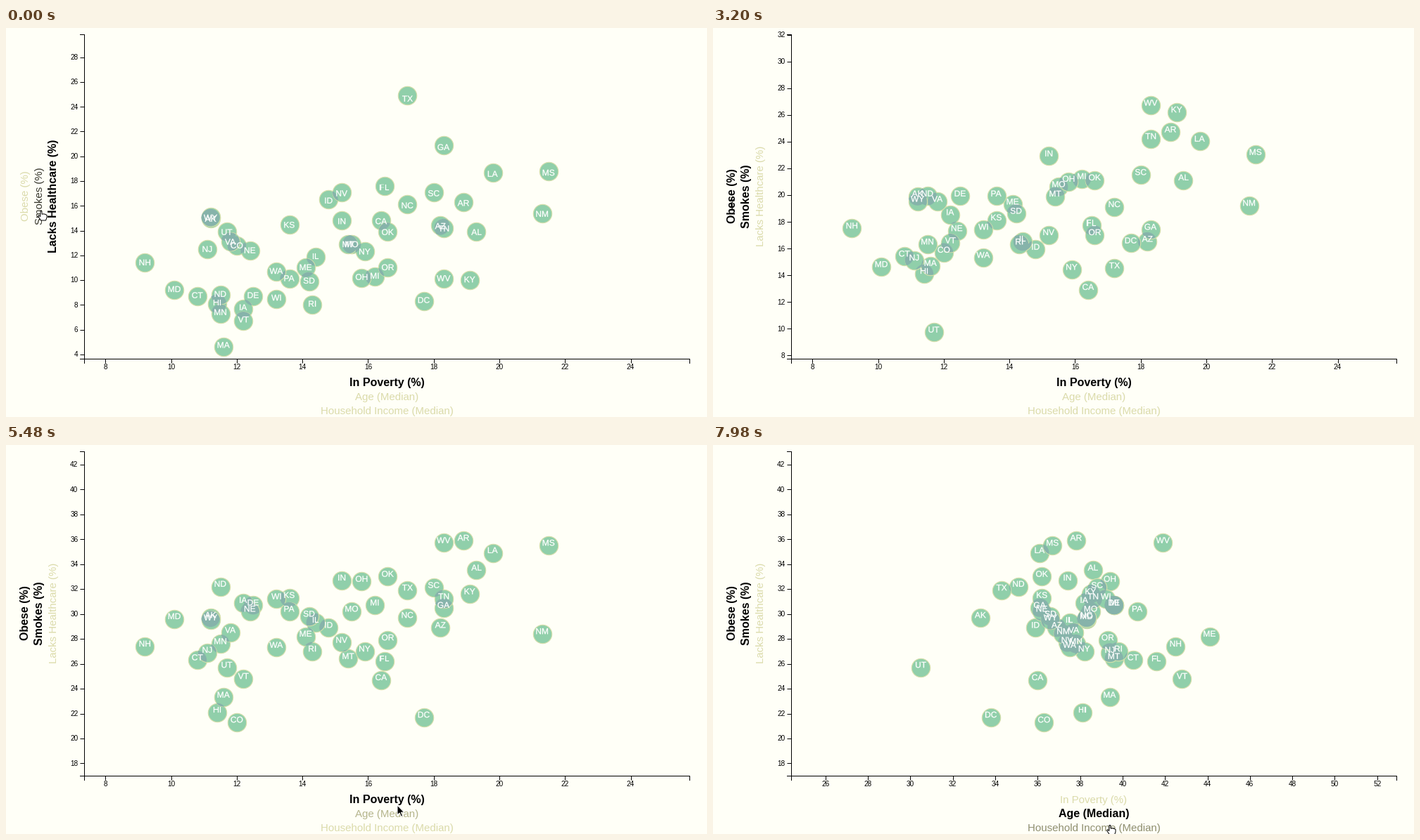
Animation, 996 px wide and 554 px high, one loop 8000 ms. Source, as a matplotlib script:

```python
import numpy as np
import matplotlib.pyplot as plt
from matplotlib.animation import FuncAnimation
from matplotlib.collections import PathCollection, PolyCollection
from matplotlib.patches import Polygon
from matplotlib.path import Path
from matplotlib.textpath import TextPath
from matplotlib.transforms import IdentityTransform

W, H, DPI = 996, 554, 64
PX = 72 / DPI                      # one pixel in points
LEFT, RIGHT, TOP, BOTTOM = 111.5, 971.5, 8.5, 470.5
R = 13.2
BG = "#fffff7"
PALE = np.array([0.86, 0.86, 0.67])
DARK = np.array([0.22, 0.22, 0.18])

STATES = ("AL AK AZ AR CA CO CT DE DC FL GA HI ID IL IN IA KS KY LA ME MD MA MI "
          "MN MS MO MT NE NV NH NJ NM NY NC ND OH OK OR PA RI SC SD TN TX UT VT "
          "VA WA WV WI WY").split()
POVERTY = np.array([
    19.3, 11.2, 18.2, 18.9, 16.4, 12, 10.8, 12.5, 17.7, 16.5,
    18.3, 11.4, 14.8, 14.4, 15.2, 12.2, 13.6, 19.1, 19.8, 14.1,
    10.1, 11.6, 16.2, 11.5, 21.5, 15.5, 15.4, 12.4, 15.2, 9.2,
    11.1, 21.3, 15.9, 17.2, 11.5, 15.8, 16.6, 16.6, 13.6, 14.3,
    18, 14.2, 18.3, 17.2, 11.7, 12.2, 11.8, 13.2, 18.3, 13.2, 11.2])
AGE = np.array([
    38.6, 33.3, 36.9, 37.8, 36, 36.3, 40.5, 39.6, 33.8, 41.6,
    36.1, 38.1, 35.9, 37.5, 37.4, 38.2, 36.2, 38.5, 36.1, 44.1,
    38.3, 39.4, 39.6, 37.8, 36.7, 38.5, 39.6, 36.2, 37.4, 42.5,
    39.4, 37.2, 38.2, 38.3, 35.1, 39.4, 36.2, 39.3, 40.7, 39.8,
    38.8, 36.6, 38.6, 34.3, 30.5, 42.8, 37.7, 37.5, 41.9, 39.2, 36.6])
HEALTH = np.array([
    13.9, 15, 14.4, 16.3, 14.8, 12.8, 8.7, 8.7, 8.3, 17.6,
    20.9, 8.1, 16.5, 11.9, 14.8, 7.7, 14.5, 10, 18.7, 11,
    9.2, 4.6, 10.3, 7.3, 18.8, 12.9, 12.9, 12.4, 17.1, 11.4,
    12.5, 15.4, 12.3, 16.1, 8.8, 10.2, 13.9, 11, 10.1, 8,
    17.1, 9.9, 14.2, 24.9, 13.9, 6.7, 13.1, 10.7, 10.1, 8.5, 15.1])
SMOKES = np.array([
    21.1, 19.9, 16.5, 24.7, 12.9, 15.7, 15.4, 19.9, 16.4, 17.7,
    17.4, 14.1, 15.9, 16.5, 22.9, 18.5, 18.1, 26.2, 24, 19.3,
    14.6, 14.7, 21.2, 16.3, 23, 20.6, 19.9, 17.3, 17, 17.5,
    15.1, 19.2, 14.4, 19.1, 19.9, 21, 21.1, 17, 19.9, 16.3,
    21.5, 18.6, 24.2, 14.5, 9.7, 16.4, 19.5, 15.3, 26.7, 17.4, 19.5])
OBESE = np.array([
    33.5, 29.7, 28.9, 35.9, 24.7, 21.3, 26.3, 30.7, 21.7, 26.2,
    30.5, 22.1, 28.9, 29.3, 32.7, 30.9, 31.3, 31.6, 34.9, 28.2,
    29.6, 23.3, 30.7, 27.6, 35.5, 30.2, 26.4, 30.2, 27.7, 27.4,
    26.9, 28.4, 27, 29.7, 32.2, 32.6, 33, 27.9, 30.2, 27,
    32.1, 29.8, 31.2, 31.9, 25.7, 24.8, 28.5, 27.3, 35.7, 31.2, 29.5])

CLICK_SMOKES, CLICK_OBESE, CLICK_AGE, SPAN = 7.2, 65.4, 139.2, 30


def mix(a, b, t):
    return a + (b - a) * t


def ease(t):
    t = min(max(t, 0), 1)
    return 4 * t ** 3 if t < 0.5 else 1 - (2 - 2 * t) ** 3 / 2


def ramp(k, start):
    return min(max((k - start) / 17, 0), 1)


def domain(data):
    return data.min() * 0.8, data.max() * 1.2


def scale(v, data, start, end):
    lo, hi = domain(data)
    return start + (end - start) * (v - lo) / (hi - lo)


def scale_x(v, data):
    return scale(v, data, LEFT, RIGHT)


def scale_y(v, data):
    return scale(v, data, BOTTOM, TOP)


def step_at(i):
    """Recorded step shown in a 20 ms slot: steps last 20, 100, 20 ms in turn."""
    n, slot = divmod(i, 7)
    return 3 * n + (0 if slot == 0 else 1 if slot < 6 else 2)


fig = plt.figure(figsize=(W / DPI, H / DPI), dpi=DPI, facecolor=BG)
ax = fig.add_axes([0, 0, 1, 1])
ax.axis("off")
plt.rcParams["font.family"] = "Liberation Sans"


class Ticks:
    def __init__(self, values, horizontal):
        self.values, self.horizontal = values, horizontal
        self.scale = scale_x if horizontal else scale_y
        align = (dict(ha="center", va="baseline") if horizontal
                 else dict(ha="right", va="baseline"))
        self.marks = [ax.plot([], [], "k", lw=PX, solid_capstyle="butt")[0] for _ in values]
        self.labels = [ax.text(0, 0, str(v), size=10 * PX, **align) for v in values]

    def update(self, a, b, t):
        for v, mark, label in zip(self.values, self.marks, self.labels):
            p = mix(self.scale(v, a), self.scale(v, b), t)
            shown = [float(lo <= v <= hi) for lo, hi in (domain(a), domain(b))]
            alpha = mix(*shown, t)
            visible = alpha > 0.01 and -20 < p < W + 20
            for art in (mark, label):
                art.set_visible(visible)
                art.set_alpha(alpha)
            if self.horizontal:
                mark.set_data([p, p], [BOTTOM, BOTTOM + 6])
                label.set_position((p, BOTTOM + 15.8))
            else:
                mark.set_data([LEFT - 6, LEFT], [p, p])
                label.set_position((LEFT - 9, p + 3.4))


class Title:
    def __init__(self, text, x, y, rotation=0):
        self.art = ax.text(x, y, text, ha="center", va="baseline",
                           rotation=rotation, rotation_mode="anchor")

    def update(self, active, level):
        self.art.set_weight("bold" if active else "normal")
        self.art.set_size((16 if active else 15) * PX)
        self.art.set_color("black" if active else mix(PALE, DARK, level))


def label_path(text):
    path = TextPath((0, 0), text, size=12, prop={"family": "Liberation Sans"})
    box = path.get_extents()
    return Path(path.vertices - [(box.x0 + box.x1) / 2, 0], path.codes)


def lenses(x, y):
    """Outlines of the areas where two circles overlap."""
    i, j = np.triu_indices(len(x), 1)
    dx, dy = x[j] - x[i], y[j] - y[i]
    d = np.hypot(dx, dy)
    near = d < 2 * R - 1
    i, j, d = i[near], j[near], d[near]
    aim = np.arctan2(dy[near], dx[near])[:, None]
    half = np.arccos(d / (2 * R))[:, None] * np.linspace(-1, 1, 14)
    out = []
    for c, a in ((i, aim + half), (j, aim + np.pi + half)):
        out.append(np.stack([x[c][:, None] + R * np.cos(a),
                             y[c][:, None] + R * np.sin(a)], axis=-1))
    return np.concatenate(out, axis=1)


# Axis lines with outer ticks
ax.plot([LEFT - 6, LEFT, LEFT, LEFT - 6], [TOP, TOP, BOTTOM, BOTTOM], "k", lw=PX)
ax.plot([LEFT, LEFT, RIGHT, RIGHT], [BOTTOM + 6, BOTTOM, BOTTOM, BOTTOM + 6], "k", lw=PX)
x_ticks = Ticks(range(8, 54, 2), True)
y_ticks = Ticks(range(4, 44, 2), False)

obese = Title("Obese (%)", 32.5, 239.5, 90)
smokes = Title("Smokes (%)", 52.5, 239.5, 90)
health = Title("Lacks Healthcare (%)", 72.5, 239.5, 90)
poverty = Title("In Poverty (%)", 541, 510)
age = Title("Age (Median)", 541, 530)
income = Title("Household Income (Median)", 541, 550)

dots = ax.scatter(POVERTY, HEALTH, s=(2 * R * PX) ** 2, fc="#90cfaa",
                  ec="#d6dfab", lw=1.1 * PX, zorder=4)
overlaps = PolyCollection([], fc="#86b3aa", ec="none", zorder=5)
ax.add_collection(overlaps, autolim=False)
names = PathCollection([label_path(s) for s in STATES], fc="white", ec="white",
                       lw=0.3, offsets=np.zeros((len(STATES), 2)),
                       offset_transform=ax.transData, zorder=6)
names.set_transform(IdentityTransform())
ax.add_collection(names, autolim=False)

SHAPES = {
    "arrow": np.array([(-3, -7), (-3, 7), (0.2, 4), (2.5, 9.2), (4.7, 8.2),
                       (2.4, 3.2), (6.8, 3.2)]),
    "beam": np.array([(-3, -7), (-1, -7), (0, -6), (1, -7), (3, -7), (1, -7), (0, -6),
                      (0, 6), (1, 7), (3, 7), (1, 7), (0, 6), (-1, 7), (-3, 7)]),
    "hand": np.array([(-3, -6.5), (-1.2, -6.5), (-0.8, -1.8), (1.5, -2.2), (4, -1.6),
                      (6, -0.5), (6, 3), (4.5, 7), (-2.5, 7), (-6.5, 1),
                      (-5.5, -0.3), (-3.2, 1.5)]),
}
STYLES = {
    "arrow": dict(fc="black", ec="white", closed=True),
    "beam": dict(fc="none", ec="black", closed=False),
    "hand": dict(fc="white", ec="black", closed=True),
}
pointers = {n: ax.add_patch(Polygon(SHAPES[n], lw=PX, zorder=9, **STYLES[n])) for n in SHAPES}

TRAIL = np.array([
    (0, 52, 267), (8, 47, 258), (45, 46, 256), (56, 28, 252), (72, 27, 252),
    (87, 110, 580), (104, 560, 580), (118, 559, 520), (130, 555, 519),
    (160, 554, 519), (168, 565, 547), (171, 566, 548)])


def move_pointer(k):
    spot = [np.interp(k, TRAIL[:, 0], TRAIL[:, c]) for c in (1, 2)]
    if k < 9 or k > 162:
        kind = "hand"
    else:
        kind = "arrow" if 72 < k < 123 else "beam"
    for name, patch in pointers.items():
        patch.set_visible(name == kind)
        patch.set_xy(SHAPES[name] + spot)


def update(i):
    k = step_at(i)
    tx = ease((k - CLICK_AGE) / SPAN)
    if k < CLICK_OBESE:
        ya, yb, ty = HEALTH, SMOKES, ease((k - CLICK_SMOKES) / SPAN)
    else:
        ya, yb, ty = SMOKES, OBESE, ease((k - CLICK_OBESE) / SPAN)

    x_ticks.update(POVERTY, AGE, tx)
    y_ticks.update(ya, yb, ty)

    x = mix(scale_x(POVERTY, POVERTY), scale_x(AGE, AGE), tx)
    y0, y1 = scale_y(ya, ya), scale_y(yb, yb)
    y = mix(y0, y1, ty)
    # The first labels sit on a slightly squeezed scale
    base = mix(0.98 * y0 + 10 if ya is HEALTH else y0, y1, ty)
    dots.set_offsets(np.column_stack([x, y]))
    overlaps.set_verts(lenses(x, y))
    names.set_offsets(np.column_stack([x, base + 0.3]))

    health.update(k < CLICK_SMOKES, 1 - ramp(k, CLICK_SMOKES))
    smokes.update(k >= CLICK_SMOKES, 1)
    obese.update(k >= CLICK_OBESE, ramp(k, 50))
    poverty.update(k < CLICK_AGE, 1 - ramp(k, CLICK_AGE))
    age.update(k >= CLICK_AGE, ramp(k, 114))
    income.update(False, ramp(k, 163))
    move_pointer(k)
    return []


ax.set_xlim(0, W)
ax.set_ylim(H, 0)
anim = FuncAnimation(fig, update, frames=400, interval=20, repeat=True,
                     repeat_delay=0, init_func=lambda: update(0))
plt.show()
```
